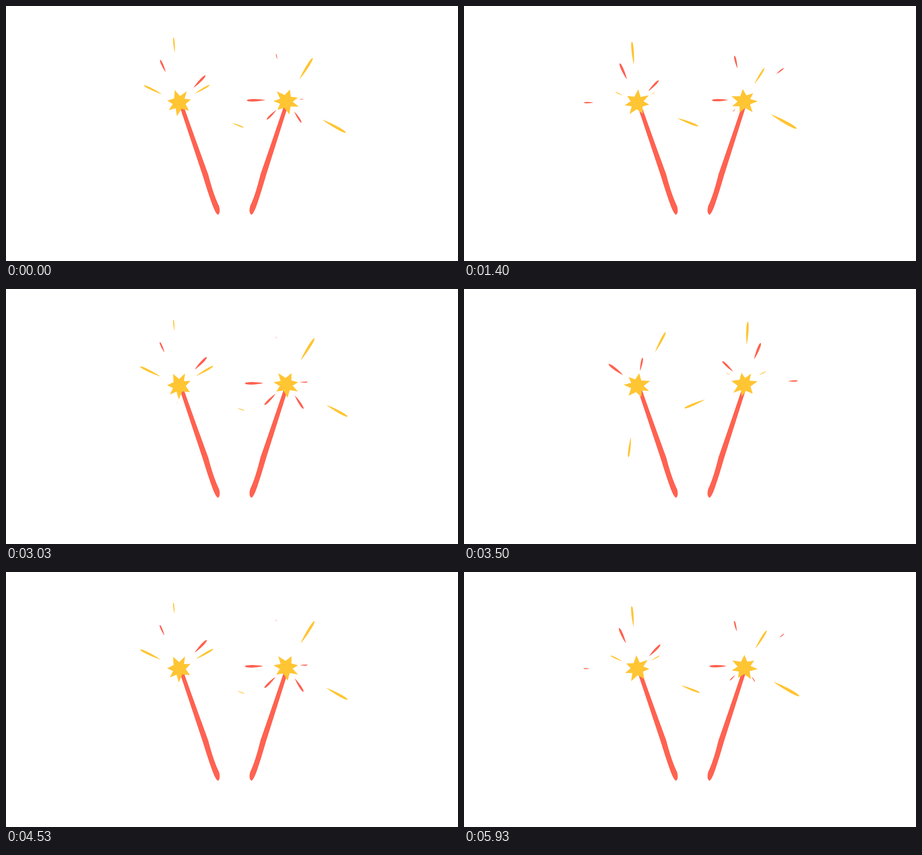
An HTML page with a canvas for the animation above (6010 ms loop, 997 by 562 pixels).

```html
<!DOCTYPE html>
<html lang="en">
<head>
<meta charset="utf-8">
<title>Sparklers</title>
<style>
html, body { margin: 0; width: 100%; height: 100%; overflow: hidden; background: #fff; }
canvas { display: block; }
</style>
</head>
<body>
<canvas id="stage" width="997" height="562"></canvas>
<script>
const ctx = document.getElementById('stage').getContext('2d');
const LOOP = 6010, CYCLE = 1500, LIFE = 615, SHIFT = 600;
const TAU = 2 * Math.PI, DEG = Math.PI / 180;
const CENTER = [382, 213];

// Sparks run outward from near to far; each launch is [time, direction in degrees].
const yellow = {
  color: '#ffc533', near: 35, far: 156, thickness: .095,
  launches: [[20, 97], [92, -62], [498, 149], [660, -124], [965, 21], [995, -95], [1352, -154], [1370, -30]],
};
const red = {
  color: '#ff6251', near: 28, far: 114, thickness: .13,
  launches: [[275, -143], [340, -79], [600, -1], [768, 43], [787, 121], [868, 180], [1038, -114], [1208, -46]],
};

const stick = new Path2D('M384 224L393 224Q420 300 446 371Q458 417 470 441Q474 455 468 460Q463 460 454 435Q445 410 434 374Z');

const mod = (a, n) => ((a % n) + n) % n;

function spark(kind, [start, deg], time) {
  const u = mod(time - start, CYCLE) / LIFE;
  if (u >= 1) return;
  // Sparks falling to the lower left fly a little farther.
  const path = kind.far + 10 * Math.cos((deg - 120) * DEG) - kind.near;
  const tail = path * u * u, head = path * (1 - (1 - u) ** 2);
  const len = head - tail, w = len * kind.thickness;
  ctx.save();
  ctx.translate(...CENTER);
  ctx.rotate(deg * DEG);
  ctx.translate(kind.near + tail, 0);
  ctx.beginPath();
  ctx.moveTo(0, 0);
  ctx.bezierCurveTo(len * .3, w * .55, len * .97, w * .85, len, 0);
  ctx.bezierCurveTo(len * .97, -w * .85, len * .3, -w * .55, 0, 0);
  ctx.fill();
  ctx.restore();
}

function burst(time) {
  for (const kind of [yellow, red]) {
    ctx.fillStyle = kind.color;
    kind.launches.forEach(launch => spark(kind, launch, time));
  }
}

// Seven uneven tips with notches between them, turning once per cycle.
function star(x, y, side, time) {
  ctx.save();
  ctx.translate(x, y);
  ctx.scale(side, 1);
  ctx.rotate(-TAU * time / CYCLE);
  ctx.beginPath();
  const wobble = i => Math.cos(2 * TAU * (i - .6) / 7);
  const angle = i => -112.5 * DEG + TAU * i / 7 + 6.5 * DEG * wobble(i);
  const point = (a, r) => ctx.lineTo(r * Math.cos(a), r * Math.sin(a));
  for (let i = 0; i < 7; i++) {
    point(angle(i), 28.5 + 2 * wobble(i));
    point((angle(i) + angle(i + 1)) / 2, 14.5);
  }
  ctx.fillStyle = yellow.color;
  ctx.fill();
  ctx.restore();
}

function draw(time) {
  ctx.clearRect(0, 0, 997, 562);
  burst(time);
  ctx.fill(stick);
  // The second sparkler is a slightly turned mirror image.
  ctx.setTransform(-1, .034, .034, 1, 993.7, -19.4);
  burst(time - SHIFT);
  ctx.setTransform(-1, 0, .017, 1, 1001, 0);
  ctx.fill(stick);
  ctx.resetTransform();
  star(...CENTER, 1, time);
  star(618, 210.5, -1, time + SHIFT + 10);
}

const begin = performance.now();
function tick() {
  const ms = Math.min((performance.now() - begin) % LOOP, 5999);
  // Two poses per tenth of a second, held for 30 and 70 ms.
  draw(Math.floor(ms / 100) * 100 + (ms % 100 >= 30 ? 100 / 3 : 0));
  requestAnimationFrame(tick);
}
tick();
</script>
</body>
</html>
```
